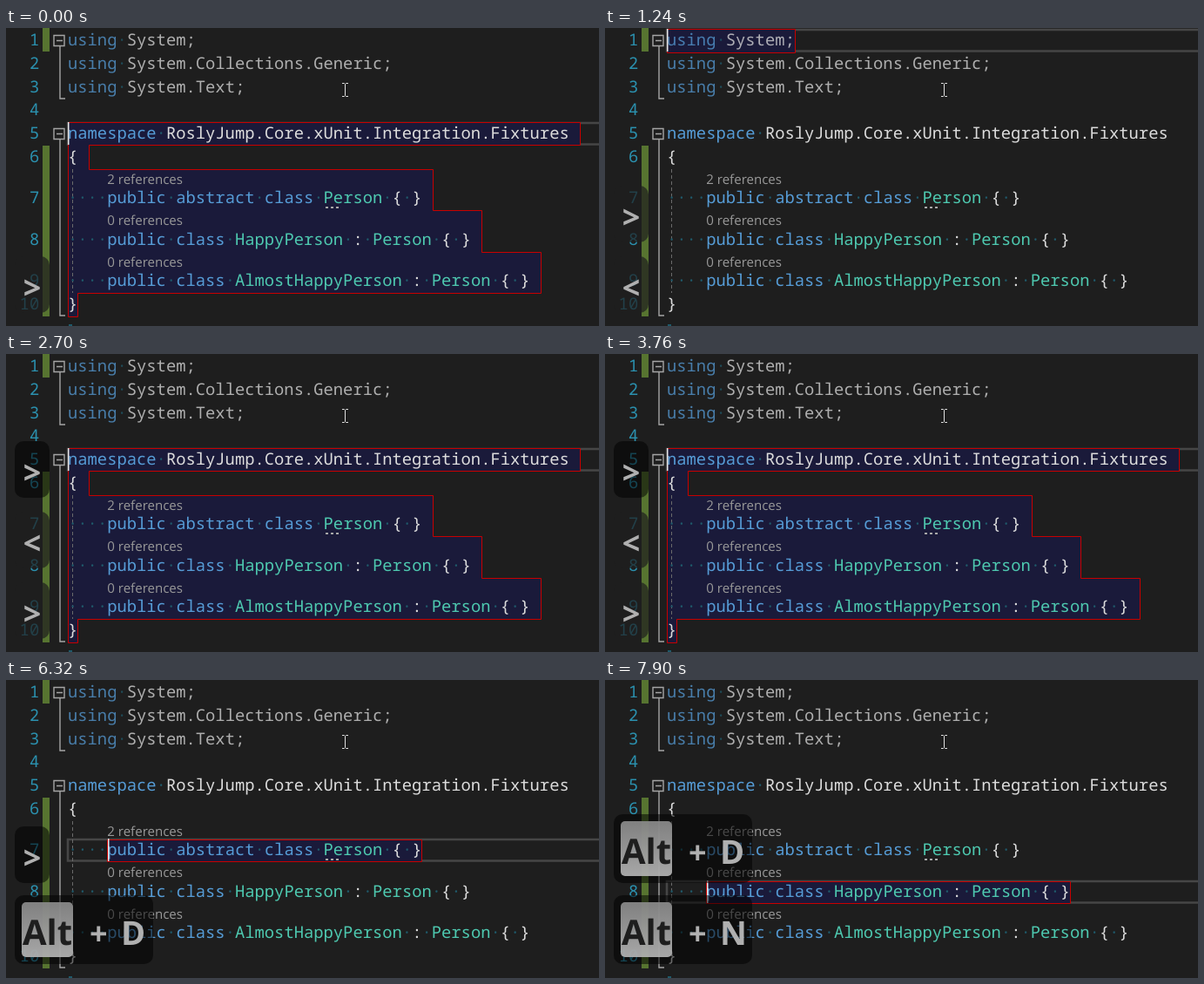
An HTML page for the animation above (8000 ms loop, 681 by 342 pixels).

```html
<!DOCTYPE html>
<html lang="en">
<head>
<meta charset="utf-8">
<title>Code navigation</title>
<style>
  html, body { margin: 0; width: 100%; height: 100%; overflow: hidden; background: #1e1e1e; }
  svg { display: block; width: 681px; height: 342px; }
  text { text-rendering: geometricPrecision; white-space: pre; }
  .code { font: 500 18.82px "Noto Sans Mono", monospace; fill: #dcdcdc; }
  .unused { opacity: .76; }
  .kw { fill: #569cd6; }
  .type { fill: #4ec9b0; }
  .dot { fill: #1f5a6b; }
  .num { font: 500 18.82px "Noto Sans Mono", monospace; fill: #2b91af; text-anchor: end; }
  .lens { font: 15.05px "Open Sans", sans-serif; fill: #999; }
  .green { fill: #577430; }
  .fold { fill: none; stroke: #a5a5a5; stroke-width: 1.4; }
  .row { fill: none; stroke: #464646; stroke-width: 2.6; }
  .sel { fill: #1a1a3a; stroke: #c80000; }
  .caret { fill: #e6e6e6; }
  .key { font: 700 38px "Open Sans", sans-serif; fill: #b0b0b0; }
  .arrow { font-size: 36px; }
  .cap { font-size: 40px; fill: #1e1e1e; }
  .shade { fill: #000; fill-opacity: .52; }
  .soft { fill: #1e1e1e; fill-opacity: .7; }
</style>
</head>
<body>
<svg viewBox="0 0 681 342">
  <defs>
    <linearGradient id="capFill" x2="0" y2="1">
      <stop stop-color="#8a8a8a"/>
      <stop offset="1" stop-color="#b4b4b4"/>
    </linearGradient>
  </defs>
  <rect width="681" height="342" fill="#1e1e1e"/>
  <g class="green">
    <rect x="42" width="8" height="27"/>
    <rect x="42" y="135" width="8" height="196"/>
  </g>
  <g id="marks"></g>
  <path d="M76.5 162V304" stroke="#6a6a6a" stroke-dasharray="4 3"/>
  <rect x="72" y="340" width="4" height="2" fill="#1f5a6b"/>
  <g class="fold">
    <path d="M62 20V81H68M62 127V330H68"/>
    <path d="M55 8.5h12v12h-12zM58 14.5h7M55 115.5h12v12h-12zM58 121.5h7"/>
  </g>
  <g id="lines"></g>
  <g fill="#a8a8a8">
    <rect x="367" y="205" width="3" height="2"/>
    <rect x="373" y="205" width="3" height="2"/>
    <rect x="379" y="205" width="3" height="2"/>
  </g>
  <g id="carets"></g>
  <path d="M386 63.5h2.5l1 1 1-1h2.5M389.5 64.5v13M386 78.5h2.5l1-1 1 1h2.5" fill="none" stroke="#e0e0e0"/>
  <g id="keys"></g>
</svg>
<script>
const LOOP = 8000;
const LEFT = 71;
const $ = id => document.getElementById(id);
const timed = [];

function add(parent, tag, attrs, content) {
  const el = document.createElementNS("http://www.w3.org/2000/svg", tag);
  for (const name in attrs) el.setAttribute(name, attrs[name]);
  if (content !== undefined) el.textContent = content;
  return parent.appendChild(el);
}

// Spans are [start, end, opacity].
const during = (el, ...spans) => timed.push({ el, spans });

const lines = [
  [1, "using System;"],
  [27.7, "using System.Collections.Generic;"],
  [54.4, "using System.Text;"],
  [81, ""],
  [108, "namespace RoslyJump.Core.xUnit.Integration.Fixtures"],
  [134.6, "{"],
  [182, "    public abstract class Person { }", "2 references"],
  [229.6, "    public class HappyPerson : Person { }", "0 references"],
  [277, "    public class AlmostHappyPerson : Person { }", "0 references"],
  [303.7, "}"]
];

function tokenClass(token) {
  if (token === " ") return "dot";
  if (/^(using|namespace|public|abstract|class)$/.test(token)) return "kw";
  return token.endsWith("Person") ? "type" : "";
}

lines.forEach(([top, source, lens], i) => {
  const y = top + 19.4;
  add($("lines"), "text", { class: "num", x: 38.2, y }, i + 1);
  const text = add($("lines"), "text", { class: i < 3 ? "code unused" : "code", x: LEFT, y });
  for (const token of source.match(/\w+| |[^\w ]+/g) || [])
    add(text, "tspan", { class: tokenClass(token) }, token === " " ? "·" : token);
  if (lens) add($("lines"), "text", { class: "lens", x: 116.3, y: top - 3.5 }, lens);
});

// Current line, selection outline and caret for one stop.
function stop(start, end, line, x, outline, ...blinks) {
  const top = Math.round(lines[line - 1][0]);
  const mark = add($("marks"), "g", {});
  add(mark, "path", { class: "row", d: `M690 ${top + 1}H71V${top + 25.5}H690` });
  add(mark, "path", { class: "sel", d: outline });
  during(mark, [start, end, 1]);
  const caret = add($("carets"), "rect", { class: "caret", x, y: top, width: 1.5, height: 26 });
  during(caret, ...blinks.map(([a, b]) => [a, b, 1]));
}

const block = "M71.5 108.5H659.5V134.5H95.5V162.5H490.5V209.5H546.5V257.5H614.5V304.5H82.5V331.5H71.5Z";
stop(0, 1240, 5, 71, block, [0, 280], [810, 1240]);
stop(1240, 2700, 1, 71, "M71.5 1.5H218.5V28.5H71.5Z", [1240, 1770], [2300, 2700]);
stop(2700, 4190, 5, 71, block, [2700, 3230], [3760, 4190]);
stop(4190, 6850, 7, 117, "M116.5 183.5H477.5V208.5H116.5Z", [4190, 4690], [5240, 5770], [6320, 6850]);
stop(6850, LOOP, 8, 117, "M116.5 231.5H534.5V256.5H116.5Z", [6850, 7350], [7900, LOOP]);

function arrowKey(label, y, shade, ...spans) {
  const g = add($("keys"), "g", { transform: `translate(0 ${y})` });
  add(g, "rect", { class: shade, x: 10, width: 40, height: 65, rx: 10 });
  add(g, "text", { class: "key arrow", x: 19.8, y: 48.5 }, label);
  during(g, ...spans);
}

function altKey(letter, y, ...spans) {
  const g = add($("keys"), "g", { transform: `translate(0 ${y})` });
  add(g, "rect", { class: "shade", x: 10, width: 159, height: 79, rx: 10 });
  add(g, "rect", { x: 18, y: 8, width: 59, height: 63, rx: 5, fill: "url(#capFill)", "fill-opacity": .92 });
  add(g, "text", { class: "key cap", x: 19, y: 57 }, "Alt");
  add(g, "text", { class: "key arrow", x: 96, y: 57 }, "+");
  add(g, "text", { class: "key", x: 132, y: 57 }, letter);
  during(g, ...spans);
}

arrowKey(">", 262, "soft", [0, 1240, 1], [2700, 4190, 1]);
arrowKey(">", 181, "soft", [1240, 2700, 1]);
arrowKey("<", 262, "soft", [1240, 2700, 1]);
arrowKey(">", 100, "shade", [2700, 4190, 1]);
arrowKey("<", 181, "soft", [2700, 4190, 1]);
arrowKey(">", 7, "shade", [4190, 4840, 1]);
arrowKey("<", 88, "shade", [4190, 6170, 1], [6170, 6320, .5]);
arrowKey(">", 168, "shade", [4190, 6850, 1]);
arrowKey(">", 74, "shade", [6850, 7630, 1], [7630, 7750, .5]);
altKey("D", 247, [4190, 6850, 1]);
altKey("D", 154, [6850, LOOP, 1]);
altKey("N", 247, [6850, LOOP, 1]);

const begin = performance.now();
function draw() {
  const t = (performance.now() - begin) % LOOP;
  for (const { el, spans } of timed) {
    const span = spans.find(([a, b]) => t >= a && t < b);
    el.style.opacity = span ? span[2] : 0;
  }
  requestAnimationFrame(draw);
}
draw();
</script>
</body>
</html>
```
